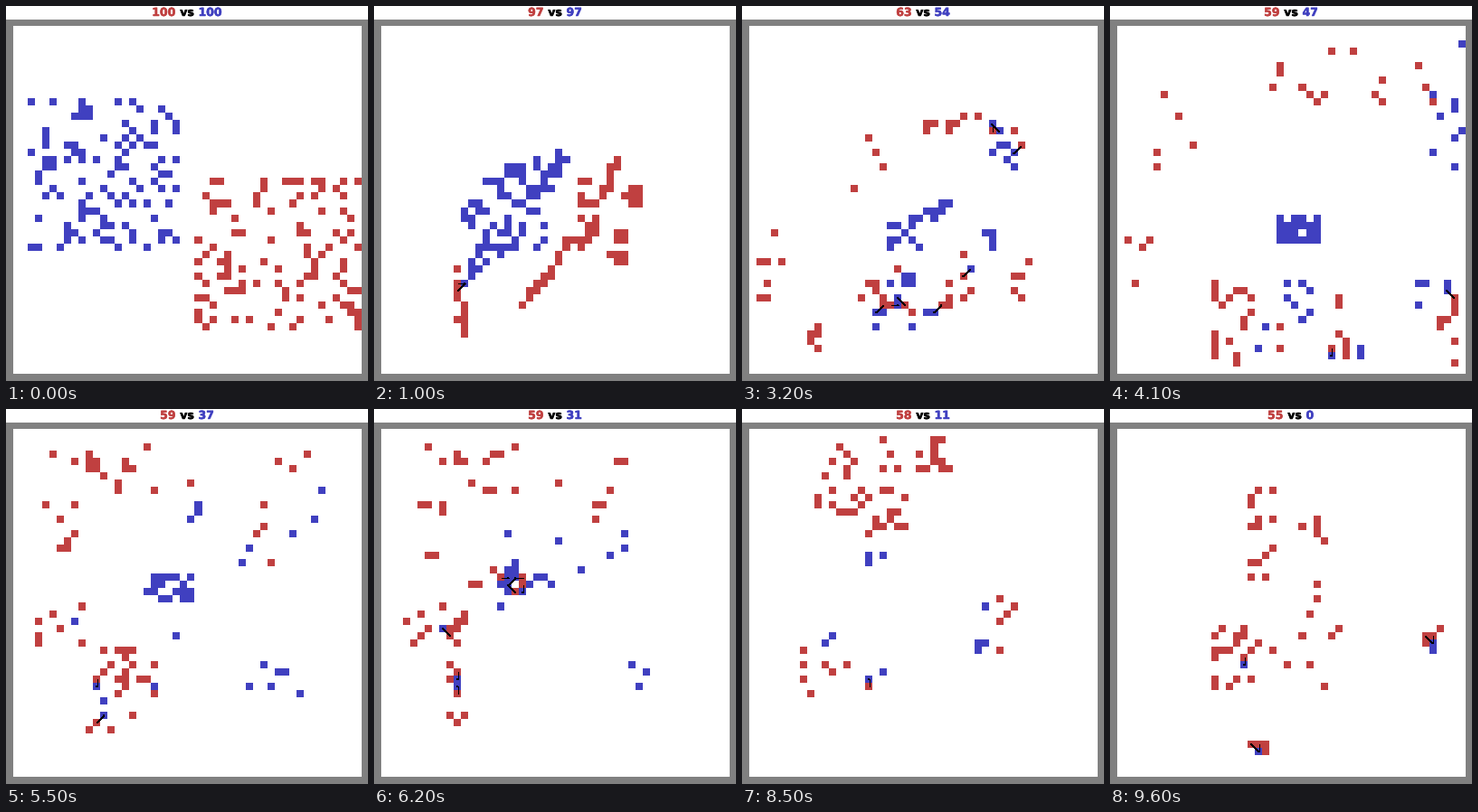
Animation of 400 by 415 pixels, one loop 9700 ms. Source, as a matplotlib script:

```python
import math
import random
from itertools import product

import matplotlib.pyplot as plt
import numpy as np
from matplotlib.animation import FuncAnimation
from matplotlib.collections import LineCollection
from matplotlib.patches import Rectangle
from matplotlib.patheffects import withStroke

W, H, DPI = 400, 415, 100
GRID, CELL, LEFT, TOP = 48, 8, 8, 23
FRAMES, INTERVAL = 97, 100
PX = 72 / DPI
RED, BLUE, GRAY = (192, 64, 64), (64, 64, 192), (128, 128, 128)

poses = []


def rgb(color):
    return tuple(v / 255 for v in color)


def squad(x0, y0, x1, y1, n):
    """n units scattered over a block of cells."""
    def place(rng, used):
        block = product(range(x0, x1 + 1), range(y0, y1 + 1))
        return rng.sample([cell for cell in block if cell not in used], n)
    return place


def battle_line(side, depth, n):
    """n units packed behind a curved front, deepest in its middle."""
    def place(rng, used):
        units = set()
        while len(units) < n:
            row = rng.randint(19, 37)
            front = 27 - 0.034 * (row - 18) ** 2
            reach = 1 + depth * math.sin(math.pi * (row - 18) / 20)
            cell = (round(front + side * (0.5 + reach * rng.random())), row)
            if cell not in used:
                units.add(cell)
        return sorted(units)
    return place


def pose(frame, red, blue, blue_left=None):
    rng, used, armies = random.Random(frame), set(), []
    for squads in (blue, red):
        army = []
        for place in squads:
            units = place(rng, used)
            used.update(units)
            army += units
        armies.insert(0, np.array(army, float))
    reds, blues = map(len, armies)
    counts = (reds, blues if blue_left is None else blue_left)
    poses.append(dict(frame=frame, armies=armies, counts=counts))


pose(0, [squad(25, 21, 47, 41, 100)], [squad(2, 10, 22, 30, 100)])

# The armies collide.
pose(22,
     [battle_line(1, 4, 45), squad(0, 34, 3, 42, 15), squad(27, 17, 31, 23, 7)],
     [battle_line(-1, 8, 62)])

# Groups scatter and chase each other.
pose(41,
     [squad(21, 2, 44, 11, 15), squad(5, 6, 12, 20, 5), squad(1, 29, 4, 35, 4),
      squad(13, 34, 18, 46, 18), squad(22, 36, 32, 47, 9), squad(44, 37, 46, 46, 8)],
     [squad(22, 26, 27, 29, 21), squad(43, 2, 47, 23, 9), squad(23, 33, 28, 40, 7),
      squad(41, 35, 45, 38, 5), squad(17, 40, 33, 46, 5)])
pose(55,
     [squad(5, 1, 25, 8, 16), squad(31, 3, 43, 18, 7), squad(3, 10, 8, 17, 7),
      squad(3, 23, 10, 29, 7), squad(11, 30, 19, 37, 18), squad(7, 39, 20, 42, 4)],
     [squad(18, 20, 24, 23, 17), squad(24, 5, 44, 19, 8), squad(32, 32, 40, 38, 6),
      squad(5, 26, 24, 40, 6)])
pose(70,
     [squad(8, 1, 17, 3, 14), squad(21, 2, 27, 6, 12), squad(5, 7, 17, 12, 10),
      squad(3, 17, 6, 26, 12), squad(5, 27, 11, 39, 11)],
     [squad(9, 16, 17, 20, 14), squad(15, 21, 25, 24, 5), squad(8, 27, 10, 34, 4),
      squad(32, 33, 34, 34, 2)])
pose(85,
     [squad(18, 1, 27, 5, 15), squad(9, 2, 14, 11, 15), squad(15, 8, 22, 15, 15),
      squad(34, 20, 36, 30, 5), squad(5, 24, 17, 40, 8)],
     [squad(16, 17, 18, 18, 3), squad(31, 23, 32, 31, 4), squad(10, 27, 11, 29, 2),
      squad(14, 33, 20, 35, 2)])

# The last defenders are surrounded.
pose(96,
     [squad(18, 8, 21, 23, 14), squad(25, 12, 28, 28, 9), squad(13, 27, 19, 36, 18),
      squad(20, 27, 30, 37, 6), squad(42, 27, 44, 29, 4), squad(18, 43, 20, 44, 4)],
     [squad(43, 28, 43, 30, 2), squad(17, 32, 17, 32, 1), squad(19, 44, 19, 44, 1)],
     blue_left=0)


def match(start, end):
    """Pair units with their nearest next cells; spare units are casualties."""
    dist = np.hypot(*(start[:, None] - end[None]).transpose(2, 0, 1))
    goal = end[dist.argmin(axis=1)].copy()
    free, taken = set(range(len(start))), set()
    for k in dist.argsort(axis=None, kind="stable"):
        i, j = divmod(int(k), len(end))
        if i in free and j not in taken:
            goal[i] = end[j]
            free.remove(i)
            taken.add(j)
    return goal, sorted(free)


def plan_leg(index):
    a, b = poses[index], poses[index + 1]
    charge = index == 0
    contact = 0.4 if charge else 0.0
    armies = []
    for side, (start, end) in enumerate(zip(a["armies"], b["armies"])):
        goal, fallen = match(start, end)
        random.Random(10 * index + side).shuffle(fallen)
        death = np.full(len(start), 2.0)
        for n, i in enumerate(fallen, 1):
            death[i] = contact + (1 - contact) * n / (len(fallen) + 1)
        armies.append((start, goal, death))
    return dict(a=a, b=b, contact=contact, power=2.3 if charge else 1, armies=armies)


legs = [plan_leg(i) for i in range(len(poses) - 1)]


def state(frame):
    leg = next(g for g in legs if frame <= g["b"]["frame"])
    a, b = leg["a"], leg["b"]
    t = (frame - a["frame"]) / (b["frame"] - a["frame"])
    move = 1 - (1 - t) ** leg["power"]
    armies = [np.rint(start + (goal - start) * move)[death > t]
              for start, goal, death in leg["armies"]]
    loss = max(0, (t - leg["contact"]) / (1 - leg["contact"]))
    counts = [round(m + (n - m) * loss) for m, n in zip(a["counts"], b["counts"])]
    return armies, counts


def find_strikes(frame, armies):
    """Units next to an enemy often hit its cell."""
    rng = random.Random(frame)
    red, blue = (sorted({tuple(u) for u in army.astype(int)}) for army in armies)
    hits = []
    for own, foes, chance in ((red, set(blue), 0.6), (blue, set(red), 0.15)):
        for c, r in own:
            around = product((c - 1, c, c + 1), (r - 1, r, r + 1))
            near = [cell for cell in around if cell in foes]
            if near and rng.random() < chance:
                hits.append((c, r, *rng.choice(near)))
    return hits


def center(c, r):
    return LEFT + CELL * c + CELL / 2 + 0.5, TOP + CELL * r + CELL / 2 + 0.5


# The small margin keeps rounding from losing a pixel row.
fig = plt.figure(figsize=((W + 0.01) / DPI, (H + 0.01) / DPI), dpi=DPI,
                 facecolor="white")
ax = fig.add_axes([0, 0, 1, 1])
field = ax.imshow(np.full((GRID, GRID, 3), 255, np.uint8), interpolation="nearest",
                  extent=(LEFT, LEFT + GRID * CELL, TOP + GRID * CELL, TOP),
                  aspect="auto", zorder=2)
ax.add_patch(Rectangle((0, 15), W, 400, color=rgb(GRAY), lw=0, antialiased=False,
                       zorder=1))
ax.set(xlim=(0, W), ylim=(H, 0))
ax.axis("off")

lines = LineCollection([], colors="black", linewidths=0.8 * PX, antialiaseds=False,
                       zorder=3)
ax.add_collection(lines, autolim=False)
heads = ax.scatter([], [], s=(2 * PX) ** 2, marker="s", color="black", linewidths=0,
                   antialiased=False, zorder=4)


def label(text, align, color):
    heavy = withStroke(linewidth=0.5 * PX, foreground=color)
    return ax.text(200, 11, text, ha=align, va="baseline", color=color,
                   family="DejaVu Sans", weight="bold", size=12.5 * PX,
                   path_effects=[heavy])


red_label = label("", "right", rgb(RED))
vs_label = label("vs", "center", "black")
blue_label = label("", "left", rgb(BLUE))


def draw(frame):
    armies, counts = state(frame)
    picture = np.full((GRID, GRID, 3), 255, np.uint8)
    for army, color in zip(armies, (RED, BLUE)):
        col, row = army.astype(int).T
        picture[row, col] = color
    field.set_data(picture)

    hits = find_strikes(frame, armies)
    segments = [(center(a, b), center(c, d)) for a, b, c, d in hits]
    lines.set_segments(segments)
    tips = [(x - 0.5, y - 0.5) for _, (x, y) in segments]
    heads.set_offsets(np.array(tips).reshape(-1, 2))

    red, blue = map(str, counts)
    middle = 200 + 4 * (len(red) - len(blue))
    red_label.set(text=red, x=middle - 12.5)
    vs_label.set_x(middle)
    blue_label.set(text=blue, x=middle + 12.5)
    return field, lines, heads, red_label, vs_label, blue_label


anim = FuncAnimation(fig, draw, frames=FRAMES, interval=INTERVAL, repeat=True,
                     repeat_delay=0, blit=False)
plt.show()
```
